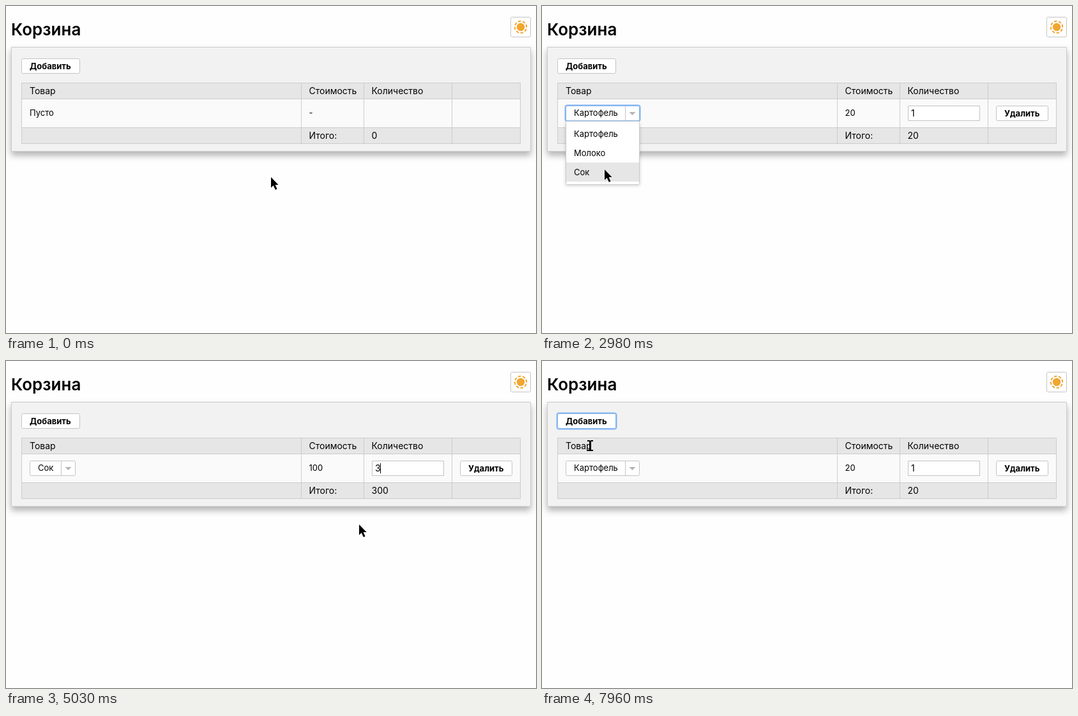
An HTML page with a canvas for the animation above (7990 ms loop, 830 by 512 pixels).

```html
<!DOCTYPE html>
<html lang="ru">
<head>
<meta charset="utf-8">
<title>Корзина</title>
<style>
  html, body { margin: 0; width: 100%; height: 100%; overflow: hidden; background: #fefefe; }
  canvas { display: block; }
</style>
</head>
<body>
<canvas id="stage" width="830" height="512"></canvas>
<script>
const ctx = document.getElementById('stage').getContext('2d');
const LOOP = 7990;
const FONT = 'Inter, "Liberation Sans", sans-serif';
const LINE = '#cccccc', EDGE = '#c4c4c4';
const GOODS = ['Картофель', 'Молоко', 'Сок'];
const ROW = 156, CONTROL_H = 24;

// Moments of the user's actions
const ADD = 1400, OPEN = 2480, PICK = 3060, ENTER = 3960, MARK = 4110,
      TYPE = 4620, REMOVE = 6840, ADD_AGAIN = 7660;

// Places where the pointer rests
const STOPS = [
  { x: 415, y: 268, from: 0, to: 500 },
  { x: 97, y: 95, from: 1300, to: 2100 },
  { x: 139, y: 169, from: 2430, to: 2550 },
  { x: 98, y: 256, from: 2890, to: 3070 },
  { x: 605, y: 174, from: 3780, to: 4150 },
  { x: 540, y: 204, from: 4520, to: 4620 },
  { x: 553, y: 256, from: 5030, to: 5060 },
  { x: 84, y: 188, from: 5650, to: 5750 },
  { x: 745, y: 169, from: 6660, to: 6950 },
  { x: 66, y: 97, from: 7650, to: 7810 },
  { x: 75, y: 133, from: 7960, to: LOOP }
];

function pointer(t) {
  const i = STOPS.findLastIndex(s => s.from <= t);
  const a = STOPS[i], b = STOPS[i + 1] || a;
  const u = t > a.to ? (t - a.to) / (b.from - a.to) : 0;
  const k = u * u * (3 - 2 * u);
  return [Math.round(a.x + (b.x - a.x) * k), Math.round(a.y + (b.y - a.y) * k)];
}

function cartState(t) {
  const within = (a, b) => t >= a && t < b;
  const filled = within(ADD, REMOVE) || t >= ADD_AGAIN;
  const juice = within(PICK, REMOVE);
  const qty = within(TYPE, REMOVE) ? 3 : 1;
  const price = juice ? 100 : 20;
  return {
    filled, qty, price,
    name: GOODS[juice ? 2 : 0],
    total: filled ? price * qty : 0,
    addFocus: within(ADD, OPEN) || t >= ADD_AGAIN,
    selectFocus: within(OPEN, PICK + 150),
    deleteFocus: within(REMOVE - 80, REMOVE),
    open: within(OPEN, PICK),
    marked: within(MARK, TYPE),
    caret: within(ENTER, MARK) || within(TYPE, REMOVE - 80) && (t - TYPE) % 1060 < 530
  };
}

function text(s, x, y, size = 13, weight = 400, color = '#000') {
  ctx.font = `${weight} ${size}px ${FONT}`;
  ctx.fillStyle = color;
  ctx.fillText(s, x, y);
}

function rect(x, y, w, h, color) {
  ctx.fillStyle = color;
  ctx.fillRect(x, y, w, h);
}

function box(x, y, w, h, r = 2, fill = '#fff', stroke = EDGE) {
  ctx.beginPath();
  ctx.roundRect(x + .5, y + .5, w - 1, h - 1, r);
  ctx.fillStyle = fill;
  ctx.fill();
  ctx.strokeStyle = stroke;
  ctx.lineWidth = 1;
  ctx.stroke();
}

function shadowed(dy, blur, alpha, draw) {
  ctx.save();
  ctx.shadowColor = `rgba(0,0,0,${alpha})`;
  ctx.shadowBlur = blur;
  ctx.shadowOffsetY = dy;
  draw();
  ctx.restore();
}

function control(x, y, w, focus) {
  const h = CONTROL_H;
  if (focus) {
    box(x - 2, y - 2, w + 4, h + 4, 4, '#b9d6f8', '#b9d6f8');
    box(x - 1, y - 1, w + 2, h + 2, 3, '#7fb1ee', '#7fb1ee');
  }
  box(x, y, w, h, 2, '#fff', focus ? '#8fbaf0' : EDGE);
}

function button(label, x, y, w, focus) {
  control(x, y, w, focus);
  text(label, x + 13, y + 17, 13, 700);
}

function sun() {
  box(790, 17, 32, 32);
  ctx.fillStyle = ctx.strokeStyle = '#f1a62f';
  ctx.beginPath();
  ctx.arc(806, 33, 6.2, 0, 7);
  ctx.fill();
  ctx.lineWidth = 2;
  for (let i = 0; i < 8; i++) {
    const a = i * Math.PI / 4 - .2;
    ctx.beginPath();
    ctx.arc(806, 33, 9.2, a - .25, a + .25);
    ctx.stroke();
  }
}

function page() {
  rect(0, 0, 830, 512, '#fefefe');
  text('Корзина', 8, 46, 26, 600);
  sun();
  shadowed(6, 10, .3, () => rect(8, 64, 814, 164, '#f2f2f2'));
  box(8, 64, 814, 164, 0, '#f2f2f2', LINE);
  rect(24, 120, 782, 96, '#e6e6e6');
  rect(24, 146, 782, 44, '#fafafa');
  for (const y of [120, 145, 190, 215]) rect(24, y, 782, 1, LINE);
  for (const x of [24, 462, 560, 698, 805]) rect(x, 120, 1, 96, LINE);
  text('Товар', 37, 138, 14);
  text('Стоимость', 474.5, 138, 14);
  text('Количество', 572.5, 138, 14);
  text('Итого:', 474.5, 208, 14);
}

function picker(s) {
  const w = s.name === GOODS[0] ? 116 : 72;
  const x = 37 + w - 23;
  control(37, ROW, w, s.selectFocus);
  text(s.name, 50, ROW + 16);
  rect(x, ROW + 1, 1, CONTROL_H - 2, EDGE);
  ctx.fillStyle = '#b4b4b4';
  ctx.beginPath();
  ctx.moveTo(x + 6.5, ROW + 10);
  ctx.lineTo(x + 16.5, ROW + 10);
  ctx.lineTo(x + 11.5, ROW + 15);
  ctx.fill();
}

function quantity(s) {
  box(573, ROW, 113, CONTROL_H, 0);
  if (s.marked) rect(578, ROW + 4, 8, 17, '#0078d7');
  text(s.qty, 578, ROW + 17, 14, 400, s.marked ? '#fff' : '#000');
  if (s.caret) rect(586, ROW + 4, 1, 16, '#000');
}

function menu(py) {
  shadowed(2, 5, .2, () => rect(37, 181, 116, 98, '#fff'));
  box(37, 180, 116, 100, 2, '#fff', LINE);
  GOODS.forEach((name, i) => {
    const y = 185 + i * 30;
    if (py >= y && py < y + 30) rect(38, y, 114, 30, '#e6e6e6');
    text(name, 50, y + 20);
  });
}

function arrow(x, y) {
  ctx.save();
  ctx.translate(x, y);
  const shape = new Path2D('M0 0V16.5L3.7 13L6.8 19.8L9.6 18.5L6.6 12H11.6Z');
  ctx.strokeStyle = 'rgba(255,255,255,.7)';
  ctx.lineWidth = 1.5;
  ctx.stroke(shape);
  ctx.fillStyle = '#000';
  ctx.fill(shape);
  ctx.restore();
}

function beam(x, y) {
  rect(x - 1, y - 8, 3, 16, '#000');
  for (const dy of [-9, 6]) {
    rect(x - 4, y + dy, 4, 2, '#000');
    rect(x + 1, y + dy, 4, 2, '#000');
  }
}

function render(t) {
  const s = cartState(t);
  const [x, y] = pointer(t);
  page();
  button('Добавить', 24, 82, 92, s.addFocus);
  text(s.total, 572.5, 208, 14);
  if (s.filled) {
    picker(s);
    text(s.price, 474.5, ROW + 16);
    quantity(s);
    button('Удалить', 711, ROW, 82, s.deleteFocus);
  } else {
    text('Пусто', 37, ROW + 16);
    text('-', 474.5, ROW + 16);
  }
  if (s.open) menu(y);
  const overInput = s.filled && x > 573 && x < 686 && y > ROW && y < ROW + CONTROL_H;
  const overHead = !s.open && x > 37 && x < 78 && y > 124 && y < 142;
  (overInput || overHead ? beam : arrow)(x, y);
}

const start = performance.now();
function tick() {
  render((performance.now() - start) % LOOP);
  requestAnimationFrame(tick);
}
tick();
</script>
</body>
</html>
```
